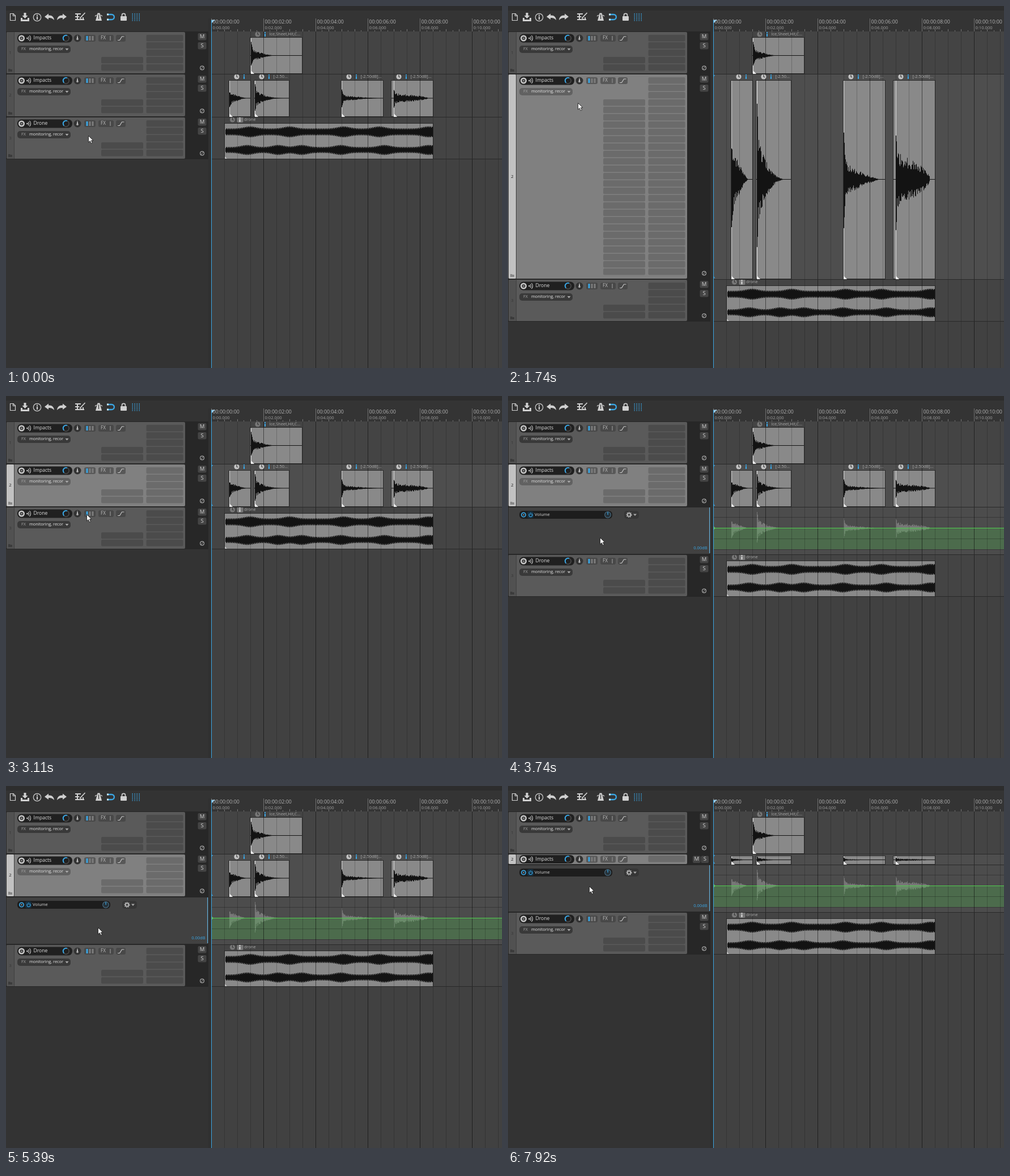
Animation of 875x640 px, one loop 8 s. Source, as an HTML page with a canvas:

```html
<!DOCTYPE html>
<html lang="en">
<head>
<meta charset="utf-8">
<title>Track zoom and envelope lane</title>
<style>
html, body { margin: 0; width: 100%; height: 100%; overflow: hidden; background: #333; }
canvas { display: block; }
</style>
</head>
<body>
<canvas id="stage" width="875" height="640"></canvas>
<script>
const g = document.getElementById('stage').getContext('2d');
const LOOP = 8000, STEP = 120, BLUE = '#3aa6e4', LIGHT = '#d0d0d0', INK = '#131313';
const ARRANGE = 362, SECOND = 46.08, TRACK2 = 120, TRACK_H = 75;

const START = { x: 145, y: 229 };
const glides = [
  { from: 120, to: 360, x: 128, y: 169 },
  { from: 640, to: 1740, x: 122.5, y: 170.5 },
  { from: 3110, to: 3590, x: 162, y: 250 },
  { from: 5950, to: 6520, x: 143, y: 177 }
];

// A sharp peak that falls quickly onto a body, which fades out over `length`.
const sheet = { x: 430, end: 523, fade: 432, up: .75, down: .55, body: .36, length: 44, power: 1.6 };
const hits = [
  { x: 393, end: 432, fade: 394, label: '', up: .31, down: .48, body: .32, length: 29, power: 1.1 },
  { x: 437, end: 500, fade: 439, label: '[-2.50...', up: .76, down: .68, body: .42, length: 52, power: 2.2 },
  { x: 591, end: 666, fade: 592, label: '[-2.50dB]...', up: .47, down: .49, body: .17, length: 64, power: 1.2 },
  { x: 679, end: 754, fade: 684, label: '[-2.50dB]...', up: .44, down: .51, body: .27, length: 60, power: .5 }
];
const droneSwells = { high: [430, 500, 595, 658, 745], low: [425, 480, 521, 590, 667, 745] };

const noise = n => { const v = Math.sin(n * 127.1) * 43758.5453; return v - Math.floor(v); };
const within = (t, from, to) => t >= from && t < to;

function pointerAt(t) {
  let { x, y } = START;
  for (const m of glides) {
    if (t < m.from) break;
    const steps = Math.round((m.to - m.from) / STEP) + 1;
    const f = Math.min(1, (Math.floor((t - m.from) / STEP) + 1) / steps);
    const eased = 1 - (1 - f) ** 3;
    x += (m.x - x) * eased;
    y += (m.y - y) * eased;
  }
  return { x: Math.round(x), y: Math.round(y) };
}

function box(x, y, w, h, color, radius = 0) {
  g.fillStyle = color;
  if (!radius) return g.fillRect(x, y, w, h);
  g.beginPath(); g.roundRect(x, y, w, h, radius); g.fill();
}
function text(s, x, y, size, color, align = 'left') {
  g.font = `${size}px "Open Sans", "Noto Sans", sans-serif`;
  g.textAlign = align; g.textBaseline = 'middle';
  g.fillStyle = color; g.fillText(s, x, y);
}
function dot(x, y, r, color) {
  g.fillStyle = color; g.beginPath(); g.arc(x, y, r, 0, 7); g.fill();
}
function arc(x, y, r, from, to, color, width = 1) {
  g.strokeStyle = color; g.lineWidth = width;
  g.beginPath(); g.arc(x, y, r, from * Math.PI, to * Math.PI); g.stroke();
}
function path(d, color, width = 0, x = 0, y = 0, flip = 1) {
  g.save(); g.translate(x, y); g.scale(flip, 1);
  const p = new Path2D(d);
  if (width) { g.strokeStyle = color; g.lineWidth = width; g.stroke(p); }
  else { g.fillStyle = color; g.fill(p); }
  g.restore();
}
const triangleDown = (x, y, color) => path('M-3 -1.5H3L0 2Z', color, 0, x, y);

function wave(hit, mid, half, color) {
  const height = (peak, d, seed) => {
    const body = hit.body * Math.max(0, 1 - d / hit.length) ** hit.power;
    const rough = d < 2 ? 1 : .5 + .5 * noise(seed);
    return half * rough * (body + (peak - hit.body) * Math.exp(-d / 2.5));
  };
  g.fillStyle = color;
  for (let x = hit.fade; x < hit.end - 1; x++) {
    const d = x - hit.fade;
    const up = height(hit.up, d, x), down = height(hit.down, d, x + .37);
    g.fillRect(x, mid - up, 1, up + down);
  }
}
function droneWave(swells, mid, base) {
  g.fillStyle = INK;
  for (let x = 387; x < 753; x++) {
    const swell = swells.reduce((sum, p) => sum + Math.exp(-(((x - p) / 15) ** 2)), 0);
    const h = base + 3.6 * swell - (x % 3 ? 0 : 1.8);
    g.fillRect(x, mid - h, 1, h * 2);
  }
}

function toolbar() {
  box(0, 0, 875, 8, '#2d2d2d');
  path('M7.5 13.5H13L16.5 17V25.5H7.5ZM12.5 13.5V17.5H16', LIGHT, 1.2);
  path('M31.5 12H35.5V17H38.5L33.5 22L28.5 17H31.5Z M26 21H29V24H38V21H41V27H26Z', LIGHT);
  arc(55, 20, 6.7, 0, 2, LIGHT, 1.2);
  box(54, 18.5, 2, 5.5, LIGHT); box(54, 15.5, 2, 2, LIGHT);
  const bend = 'M-9 0L-2 -5.5V-2.5C4 -3 7.5 0 8 6C5 2.500 2 1.500 -2 2V5Z';
  path(bend, LIGHT, 0, 77, 19);
  path(bend, LIGHT, 0, 98, 19, -1);
  path('M122 14H132M122 19H130M122 24H138M126 13V25M132 21V25M136 20V25', LIGHT, 2);
  path('M139 12L129 22', '#333', 4);
  path('M139.5 12L130 22', LIGHT, 1.8);
  path('M161.5 12.5H165.5L169 26H158Z', LIGHT);
  path('M163.5 15V23', '#333', 1.2);
  path('M157 18L160 16M170 18L167 16', LIGHT, 1.4);
  path('M179 15H186C192.5 15 192.5 24 186 24H179', BLUE, 2.3);
  box(178, 13.5, 3, 3, '#c7e6f6'); box(178, 22.5, 3, 3, '#c7e6f6');
  box(202, 18, 11, 8, LIGHT, 1);
  path('M204.5 18V16C204.5 12.5 210.5 12.5 210.5 16V18', LIGHT, 1.6);
  for (let c = 0; c < 4; c++)
    for (let r = 0; r < 6; r++) box(222.5 + c * 4, 13 + r * 2.4, 1.4, 1.4, BLUE);
}

function ruler() {
  box(ARRANGE, 8, 513, 37, '#343434');
  for (let i = 0; i < 45; i++)
    box(Math.floor(ARRANGE + i * SECOND / 4), i % 2 ? 43 : 41, 1, i % 2 ? 2 : 4, '#777');
  for (let s = 0; s <= 10; s += 2) {
    const x = Math.floor(ARRANGE + s * SECOND), n = String(s).padStart(2, '0');
    box(x, 22, 1, 23, '#707070');
    text(`00:00:${n}:00`, x + 2.5, 29, 8.8, '#b2b2b2');
    text(`0:${n}.000`, x + 2.5, 39, 7.6, '#a0a0a0');
  }
  path('M362 24.5H369L362 31Z', '#9ccbe5');
}

function trackPanel(n, name, top, h, selected) {
  const compact = h < 40, cy = top + (compact ? 9.5 : 12), bottom = top + h;
  box(0, top, 357, h, '#272727');
  box(1, top + 1, 315, h - 2, selected ? '#808080' : '#5a5a5a', 2);
  box(1, top + 1, 13, h - 2, selected ? '#c2c2c2' : '#515151', 2);
  box(14, top + 1, 1, h - 2, '#3f3f3f');
  text(n, 7.5, compact ? cy : top + h / 2, 7.8, selected ? '#222' : '#383838', 'center');

  const rows = Math.floor((h - 6) / 13);
  for (let r = 0; r < rows; r++) {
    const y = top + (compact ? 3 : 6) + r * 13;
    box(247.5, y, 65, 11.5, 'rgba(0,0,0,.17)', 2);
    if (r > 2) box(168, y, 74, 11.5, 'rgba(0,0,0,.17)', 2);
  }

  box(20, cy - 7.5, 97, 15, '#202020', 7);
  dot(27.5, cy, 5.5, '#c9c9c9'); dot(27.5, cy, 3, '#333'); dot(27.5, cy, 1.6, '#888');
  dot(37.5, cy, 1.3, LIGHT);
  arc(36.5, cy, 4, -.28, .28, LIGHT, 1.1); arc(36.5, cy, 7, -.25, .25, LIGHT, 1.1);
  text(name, 48.5, cy, 8.6, '#dedede');
  arc(106, cy, 5.2, -.4, .75, '#4a4a4a', 1.6);
  arc(106, cy, 5.2, .75, 1.62, BLUE, 2);
  dot(126, cy, 6.5, '#333');
  path('M-1.5 2L0 -6L1.5 2Z', LIGHT, 0, 126, cy); dot(126, cy + 1.5, 1.7, '#aaa');

  const button = selected ? '#585858' : '#484848';
  box(138, cy - 6, 20, 12, button, 3);
  for (let i = 0; i < 3; i++) box(141.5 + i * 5, cy - 4, 3, 8, i ? '#7c7c7c' : BLUE);
  box(163, cy - 6, 27, 12, button, 3);
  text('FX', 167, cy, 8.2, '#bdbdbd'); box(183, cy - 4, 2, 8, '#777');
  box(194, cy - 6, 17, 12, button, 3);
  path('M197 3.5H200.5L204.5 -3H208.5', '#c8c8c8', 1.2, 0, cy);

  const place = i => compact ? [326 + i * 14.5, cy - 6, 13.5] : [338.5, top + 3 + i * 16, 15];
  ['M', 'S'].forEach((s, i) => {
    const [x, y, w] = place(i);
    box(x, y, w, 12.5, '#444', 2);
    text(s, x + w / 2, y + 6.5, 9.5, '#d2d2d2', 'center');
  });
  if (compact) return;
  path('M4 0H7L8 1H11V5H4Z', selected ? '#888' : '#3b3b3b', 0, 0, bottom - 9);
  box(20, cy + 13, 94, 13, selected ? '#616161' : '#393939', 5);
  text('FX', 27, cy + 19.5, 7.2, '#a5a5a5');
  text('monitoring, recor', 41, cy + 19.5, 7.4, '#e8e8e8');
  triangleDown(107.5, cy + 19.5, '#aaa');
  arc(346, bottom - 10.5, 3.4, 0, 2, '#a5a5a5', 1.2);
  path('M-2.5 2.5L2.5 -2.5', '#a5a5a5', 1, 346, bottom - 10.5);
}

function lanePanel(top, h, ready) {
  const cy = top + 14;
  box(0, top, 357, h, '#272727');
  box(1, top + 1, 355, h - 2, '#414141');
  box(20, cy - 7, 164, 14, '#1d1d1d', 6);
  arc(27.5, cy, 3.7, 0, 2, BLUE, 1.7); dot(27.5, cy, 1.3, '#888');
  box(34, cy - 6, 11, 12, '#173040', 3);
  arc(40, cy + .5, 3, -.3, 1.3, BLUE, 1.2); box(39.5, cy - 4, 1, 4, BLUE);
  text('Volume', 47, cy, 7.6, '#d8d8d8');
  if (!ready) return;
  dot(176, cy, 5.8, '#26323a'); arc(176, cy, 5.3, 0, 2, '#48697c', 1.2);
  box(175.5, cy - 5, 1.2, 5, BLUE);
  box(205, cy - 7, 26, 14, '#363636', 5);
  g.setLineDash([1.8, 1.3]); arc(213.5, cy, 4.2, 0, 2, '#b5b5b5', 1.6); g.setLineDash([]);
  arc(213.5, cy, 2.7, 0, 2, '#b5b5b5', 1.7); triangleDown(224, cy, '#aaa');
  text('0.00dB', 351.5, top + h - 11, 7.5, BLUE, 'right');
  box(355, top + 1, 1.3, h - 3, '#69aed6');
}

function laneCurve(top, h) {
  const span = h - 9, mid = top + span / 2, parts = h > 200 ? 16 : 4;
  for (const hit of hits) wave(hit, mid, span / 2, '#777');
  box(ARRANGE, mid, 513, span / 2, 'rgba(74,190,74,.27)');
  for (let i = 1; i <= parts; i++)
    box(ARRANGE, Math.floor(top + span * i / parts), 513, 1, 'rgba(0,0,0,.26)');
}
function laneLine(top, h) {
  const mid = Math.floor(top + (h - 9) / 2);
  box(ARRANGE, mid, 513, 1, '#52cf50');
  arc(363, mid + .5, 1.8, -.5, .5, '#75e06e');
}

function item(x, end, top, bottom) {
  box(x, top, end - x, bottom - top, '#2b2b2b');
  box(x + 1, top + 1, end - x - 2, bottom - top - 2, '#898989');
}
function sound(hit, top, bottom) {
  const mid = (top + bottom - 1) / 2;
  box(hit.fade, top + 1, 1, bottom - top - 1, '#dedede');
  box(hit.x + 1, mid - .5, hit.end - hit.x - 2, 1, INK);
  wave(hit, mid, (bottom - top) / 2, INK);
  notch(hit.fade, bottom, 6, '#f3f3f3');
}
function notch(x, bottom, size, color) {
  path(`M0 0V${-size}L${size} 0Z`, color, 0, x, bottom);
}
function itemHead(clock, y, label, { dim = false, boxed = false } = {}) {
  dot(clock, y, 4.6, dim ? '#777' : '#c2c2c2');
  path('M0 -3.5V0L2 1', '#333', 1.2, clock, y);
  if (boxed) box(clock + 8, y - 5, 11, 10, '#777', 2);
  const mark = boxed ? '#ddd' : BLUE;
  box(clock + 12, y - 4, 2, 2, mark); box(clock + 12, y - 1, 2, 5, mark);
  text(label, clock + 20.5, y + .5, 7.4, '#a9a9a9');
}

function gridLines() {
  for (let i = 0; i < 23; i++)
    box(Math.floor(ARRANGE + i * SECOND / 2), 45, 1, 595, i % 4 ? 'rgba(0,0,0,.2)' : 'rgba(0,0,0,.5)');
}

function arrange(h2, lane, selected, ready) {
  const b2 = TRACK2 + h2, top3 = b2 + lane, compact = h2 < 40;
  const itemTop = TRACK2 + (compact ? 3 : 11);
  box(ARRANGE, 45, 513, 595, '#414141');
  box(ARRANGE, 45, 513, top3 + TRACK_H - 45, '#444');
  if (selected) box(ARRANGE, TRACK2, 513, h2, '#4e4e4e');
  if (lane) box(ARRANGE, b2, 513, lane, '#4c4c4c');
  if (ready) laneCurve(b2, lane);
  item(sheet.x, sheet.end, 55, TRACK2);
  for (const hit of hits) item(hit.x, hit.end, itemTop, b2);
  item(385, 754, top3 + 11, top3 + TRACK_H);
  gridLines();

  sound(sheet, 56, TRACK2);
  itemHead(444, 50, 'Ice,Sheet,Hit,C...', { dim: true });
  for (const hit of hits) {
    sound(hit, itemTop, b2);
    if (!compact) itemHead(hit.x + 14, 125, hit.label);
  }
  droneWave(droneSwells.high, top3 + 26.5, 6);
  droneWave(droneSwells.low, top3 + 58.5, 5.2);
  notch(386, top3 + TRACK_H, 5, '#c5c5c5');
  itemHead(399.5, top3 + 5, 'drone', { dim: true, boxed: true });

  for (const y of [TRACK2, b2, top3, top3 + TRACK_H - 1]) box(ARRANGE, y, 513, 1, '#292929');
  if (ready) laneLine(b2, lane);
  if (selected) path(`M365 ${TRACK2 + 2.5}H363V${TRACK2 + 5}M365 ${b2 - 2.5}H363V${b2 - 5}`, BLUE, 1);
}

function draw(t) {
  const selected = t >= 360, laneOpen = t >= 3590, ready = t >= 3740;
  const h2 = within(t, 1620, 2400) ? 363 : t < 7920 ? 76 : 19;
  const lane = !laneOpen ? 0 : within(t, 4960, 5390) ? 362 : 84;
  const b2 = TRACK2 + h2, p = pointerAt(t);
  box(0, 0, 875, 640, '#333');
  arrange(h2, lane, selected, ready);
  toolbar();
  ruler();
  trackPanel('1', 'Impacts', 45, TRACK_H, false);
  trackPanel('2', 'Impacts', TRACK2, h2, selected);
  if (laneOpen) lanePanel(b2, lane, ready);
  trackPanel('3', 'Drone', b2 + lane, TRACK_H, false);
  box(357, 22, 5, 618, '#303030');
  box(ARRANGE, 25, 1, 615, BLUE);
  const arrow = 'M.5 .5V12L3.3 9.5L5.3 14L7.3 13L5.4 8.8H9Z';
  path(arrow, '#fff', 0, p.x, p.y);
  path(arrow, '#111', .8, p.x, p.y);
}

function tick() {
  draw(performance.now() % LOOP);
  requestAnimationFrame(tick);
}
tick();
</script>
</body>
</html>
```
